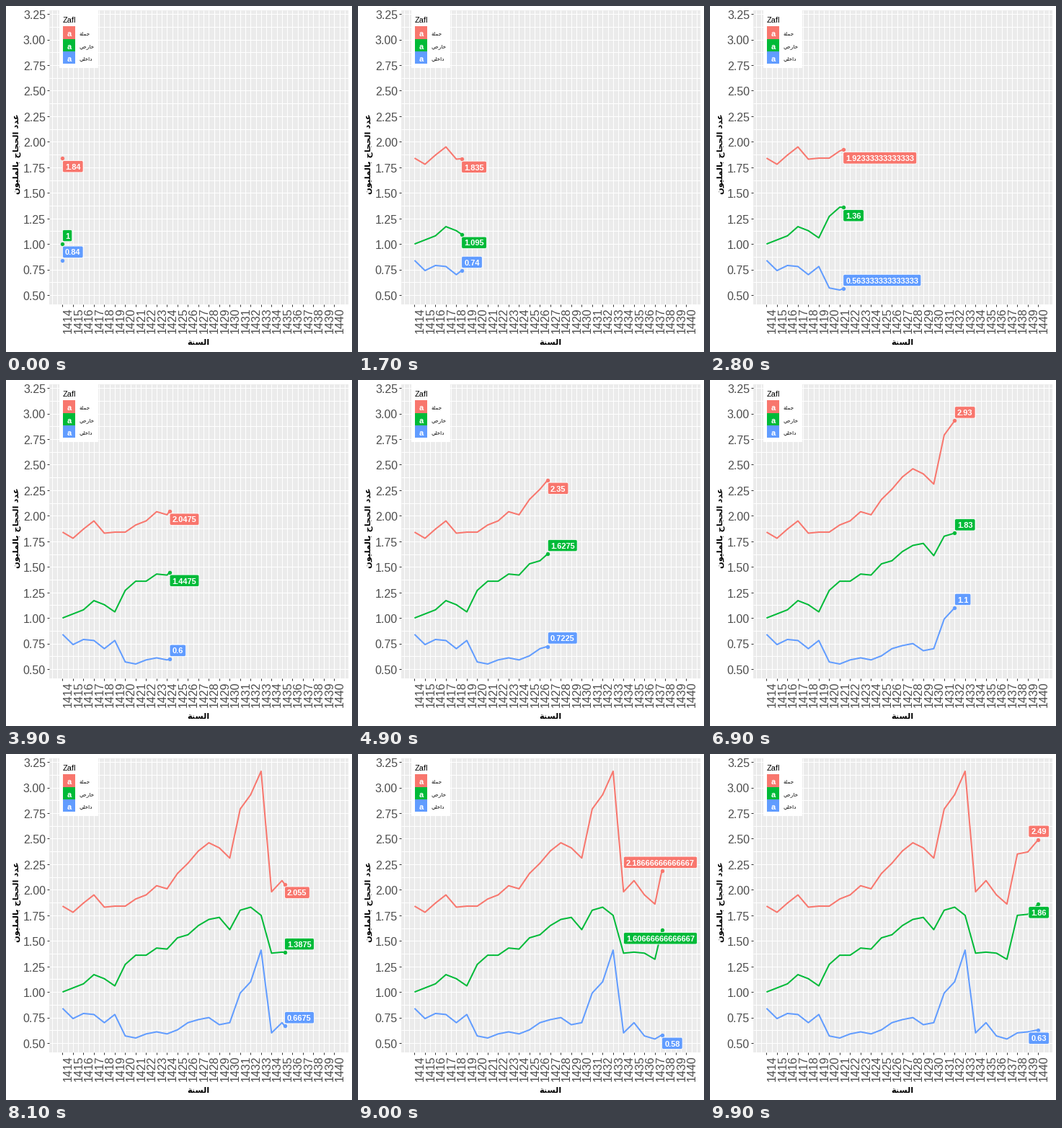
Recreate the animation shown at these times as a matplotlib script. Size 480 px wide and 480 px high, loop 10000 ms.

```python
import numpy as np
import matplotlib.pyplot as plt
from matplotlib.animation import FuncAnimation
from matplotlib.patches import FancyBboxPatch, Rectangle

SIZE, FRAMES = 480, 100
RED, GREEN, BLUE = "#F8766D", "#00BA38", "#619CFF"
LEFT, RIGHT, TOP, BOTTOM = 60, 474.5, 5.5, 414

YEARS = np.arange(1414, 1441)
ABROAD = np.array([
    100, 104, 108, 117, 113, 106, 127, 136, 136, 143, 142, 153, 156, 165,
    171, 173, 161, 180, 183, 175, 138, 139, 138, 132, 175, 176, 186]) / 100
LOCAL = np.array([
    84, 74, 79, 78, 70, 78, 57, 55, 59, 61, 59, 63, 70, 73,
    75, 68, 70, 99, 110, 141, 60, 70, 57, 54, 60, 61, 63]) / 100

# each year lands on a whole frame; values are interpolated in between
KEYS = np.round(np.linspace(0, FRAMES - 1, len(YEARS)))

# the Unicode block of joined forms follows the alphabet:
# two forms for letters that do not join onward, four for the rest
NO_JOIN = "اةدذرزوى"
LETTERS, code = {}, 0xFE8D
for c in "ابةتثجحخدذرزسشصضطظعغفقكلمنهوىي":
    LETTERS[c] = code
    code += 2 if c in NO_JOIN else 4


def arabic(s):
    """Shape the letters and put them in visual order."""
    def joins(a, b):
        return a in LETTERS and b in LETTERS and a not in NO_JOIN

    padded = f" {s} "
    out = []
    for before, c, after in zip(padded, s, padded[2:]):
        form = joins(before, c) + 2 * joins(c, after)
        out.append(chr(LETTERS[c] + form) if c in LETTERS else c)
    return "".join(reversed(out))


def px(year):
    return 78.45 + (year - 1414) * 14.497


def py(value):
    return 471.97 - value * 141.8


fig = plt.figure(figsize=(SIZE / 72, SIZE / 72), dpi=72, facecolor="white")
ax = fig.add_axes([0, 0, 1, 1])
ax.set(xlim=(0, SIZE), ylim=(SIZE, 0))
ax.axis("off")


def rect(x0, y0, x1, y1, color, z):
    ax.add_patch(Rectangle((x0, y0), x1 - x0, y1 - y0, fc=color, lw=0, zorder=z))


def text(x, y, s, size, color="black", font="Liberation Sans", **kw):
    return ax.text(x, y, s, fontsize=size, color=color, family=font,
                   va="baseline", rotation_mode="anchor", **kw)


def draw_panel():
    rect(LEFT, TOP, RIGHT, BOTTOM, "#EBEBEB", 0)
    ax.vlines(px(np.arange(1413, 1441.1, 0.5)), TOP, BOTTOM, "white", lw=1, zorder=1)
    ax.hlines(py(np.arange(0.5, 3.26, 0.125)), LEFT, RIGHT, "white", lw=1, zorder=1)

    values = np.arange(0.5, 3.26, 0.25)
    ax.hlines(py(values), LEFT - 3, LEFT, "#333333", lw=1)
    for v in values:
        text(55, py(v) + 6.8, f"{v:.2f}", 16, "#4D4D4D", ha="right")
    ax.vlines(px(YEARS), BOTTOM, BOTTOM + 3, "#333333", lw=1)
    for year in YEARS:
        text(px(year) + 12.7, 436.5, str(year), 16, "#4D4D4D",
             ha="center", rotation=90)

    title = dict(font="DejaVu Sans", weight="bold", ha="center")
    text(267, 470, arabic("السنة"), 11.4, **title)
    text(17.5, 205.5, arabic("عدد الحجاج بالمليون"), 11.4, rotation=90, **title)


def draw_legend():
    rect(74, 6, 128, 86, "white", 2)
    text(79, 23, "Zafl", 11, zorder=3)
    for i, (color, name) in enumerate(
            ((RED, "جملة"), (GREEN, "خارجي"), (BLUE, "داخلي"))):
        y = 28.4 + 17.3 * i
        rect(79, y, 96.3, y + 17.3, color, 3)
        text(87.7, y + 14, "a", 11, "white", weight="bold", ha="center", zorder=4)
        text(101.8, y + 12, arabic(name), 7.4, font="DejaVu Sans", zorder=4)


class Series:
    FONT, PAD, HEIGHT, GAP = 11, 3.6, 16.4, 11.6

    def __init__(self, values, color, z, side, flips):
        """side is -1 for a label above the point; it turns over at each flip."""
        self.values, self.side, self.flips = values, side, flips
        self.line, = ax.plot([], [], color=color, lw=2, zorder=5,
                             solid_capstyle="butt", solid_joinstyle="round")
        self.dot, = ax.plot([], [], "o", color=color, ms=5.4, mew=0, zorder=6)
        self.box = FancyBboxPatch(
            (0, 0), 1, 1, boxstyle="round,pad=0,rounding_size=2.2",
            fc=color, ec="white", lw=0.8, zorder=z)
        ax.add_patch(self.box)
        self.label = text(0, 0, "", self.FONT, "white", weight="bold", zorder=z + 0.5)

    def show(self, frame):
        year = np.interp(frame, KEYS, YEARS)
        value = np.interp(frame, KEYS, self.values)
        x, y = px(year), py(value)
        done = KEYS <= frame
        self.line.set_data(np.append(px(YEARS[done]), x),
                           np.append(py(self.values[done]), y))
        self.dot.set_data([x], [y])

        s = f"{value:.15g}"
        dots = s.count(".")
        width = self.FONT * (0.556 * (len(s) - dots) + 0.278 * dots) + 2 * self.PAD
        left = min(x, 470.5 - width)
        half = self.HEIGHT / 2
        side = self.side * (-1) ** sum(frame >= f for f in self.flips)
        mid = y + self.GAP * side
        if not TOP + 3 < mid - half < mid + half < BOTTOM - 2:
            mid = 2 * y - mid
        self.box.set_bounds(left, mid - half, width, self.HEIGHT)
        self.label.set_text(s)
        self.label.set_position((left + self.PAD, mid + 4.2))


draw_panel()
draw_legend()
series = [
    Series(ABROAD + LOCAL, RED, 7, 1, (55, 79, 90)),
    Series(ABROAD, GREEN, 8, -1, (8, 48, 90)),
    Series(LOCAL, BLUE, 9, -1, (90,)),
]


def update(frame):
    for s in series:
        s.show(frame)
    return []


anim = FuncAnimation(fig, update, frames=FRAMES, interval=100,
                     repeat=True, repeat_delay=0, blit=False)
plt.show()
```
